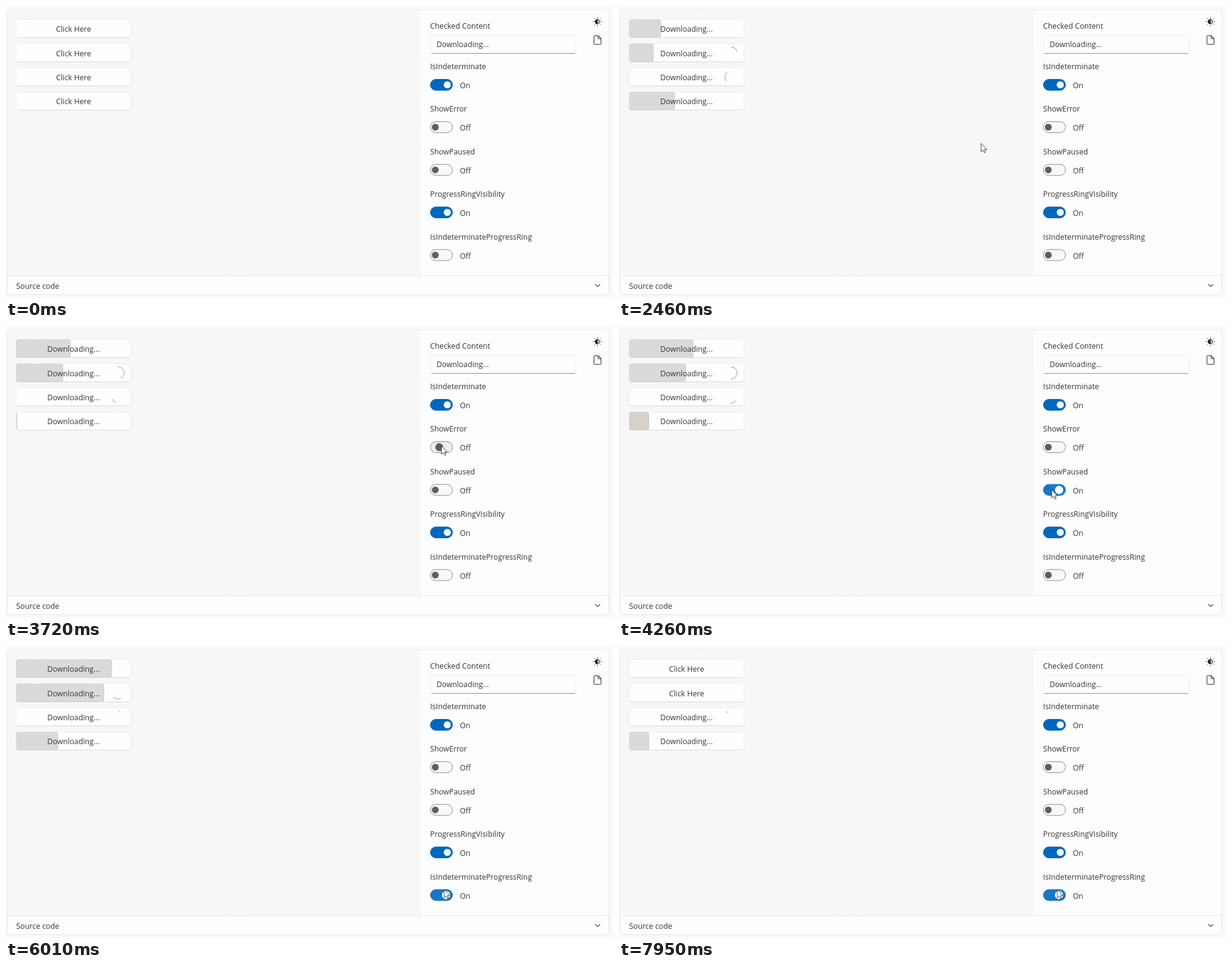
An HTML page for the animation above (8000 ms loop, 989 px wide and 476 px high).

```html
<!DOCTYPE html>
<html lang="en">
<head>
<meta charset="utf-8">
<title>Progress buttons</title>
<style>
  html, body { margin: 0; width: 100%; height: 100%; overflow: hidden; background: #f9f9f9; }
  svg { display: block; width: 100%; height: 100%; }
  text { font: 12.3px "Open Sans", "Noto Sans", sans-serif; fill: #353535; }
</style>
</head>
<body>
<svg id="stage" viewBox="0 0 989 476">
  <defs>
    <linearGradient id="tint" x1="0" y1="1" x2="0.7" y2="0">
      <stop offset="0" stop-color="#faf8f7"/>
      <stop offset="0.5" stop-color="#f7f7f7"/>
      <stop offset="1" stop-color="#f8f8f8"/>
    </linearGradient>
  </defs>
  <rect x="1.5" y="6.5" width="981" height="464" rx="7" fill="url(#tint)" stroke="#ebebeb"/>
  <path d="M676 7H975q7 0 7 7V439H676Z" fill="#fdfdfd"/>
  <path d="M2 439.5H982V464q0 6.500 -7 6.500H9q-7 0 -7 -6.500Z" fill="#fdfdfd" stroke="#e8e8e8"/>
  <text x="16.500" y="461">Source code</text>
  <path d="M960 453.500l4 4 4-4" fill="none" stroke="#444" stroke-width="1.100"/>

  <text x="691" y="37">Checked Content</text>
  <rect x="691.500" y="47.500" width="237" height="30" rx="3.500" fill="#fefefe" stroke="#ececec"/>
  <path d="M693 77.300H927" stroke="#8c8c8c"/>
  <text x="701.500" y="66.500">Downloading...</text>

  <g id="sun" fill="none" stroke="#222" stroke-linecap="round">
    <circle cx="963.500" cy="25.500" r="3.600"/>
    <path d="M963.500 21.900a3.600 3.600 0 0 0 0 7.200Z" fill="#222"/>
  </g>
  <path d="M959.500 48.500H965l4.500 4.500v8q0 1.500 -1.500 1.500h-8.500q-1.500 0 -1.500 -1.500v-11q0 -1.500 1.500 -1.500ZM964.800 48.700v4.500h4.500" fill="none" stroke="#3a3a3a" stroke-width="1.100"/>
</svg>
<script>
const LOOP = 8000, LEFT = 16.5, WIDTH = 187, HEIGHT = 29.5;
const RATE = 0.9875; // recorded clock against control clock
const stage = document.getElementById('stage');

function add(parent, tag, attrs, content) {
  const node = document.createElementNS('http://www.w3.org/2000/svg', tag);
  set(node, attrs);
  if (content) node.textContent = content;
  return parent.appendChild(node);
}
function set(node, attrs) {
  for (const key in attrs) node.setAttribute(key, attrs[key]);
}
const clamp = x => Math.min(1, Math.max(0, x));
const smooth = x => x * x * (3 - 2 * x);
const linear = x => x;
const mod = (a, n) => ((a % n) + n) % n;

function sample(rows, t, ease) {
  if (t <= rows[0][0]) return rows[0].slice(1);
  for (let i = 1; i < rows.length; i++) {
    const a = rows[i - 1], b = rows[i];
    if (t < b[0]) {
      const k = ease((t - a[0]) / (b[0] - a[0]));
      return a.slice(1).map((v, j) => v + (b[j + 1] - v) * k);
    }
  }
  return rows[rows.length - 1].slice(1);
}

// cubic-bezier(.4, 0, .6, 1)
function spline(x) {
  x = clamp(x);
  let lo = 0, hi = 1;
  for (let i = 0; i < 18; i++) {
    const u = (lo + hi) / 2, v = 1 - u;
    if (1.2 * u * v * v + 1.8 * u * u * v + u ** 3 < x) lo = u; else hi = u;
  }
  return smooth(lo);
}

const RING_SWITCH = 5655;
const ERROR = [2990, 3650], PAUSED = [4050, 4735];
const inside = (span, t) => t >= span[0] && t < span[1];

const pointer = [
  [70, 150, 62], [420, 135, 36], [660, 135, 36], [980, 133, 78], [1120, 133, 78],
  [1400, 131, 117], [1530, 131, 117], [1720, 129, 150], [1950, 129, 150],
  [2310, 612, 214], [2420, 590, 224], [2470, 590, 224], [2540, 600, 213],
  [2930, 710, 187], [3660, 710, 187], [3960, 705, 267], [4750, 705, 267],
  [5030, 710, 340], [5400, 714, 397]
];

const buttons = [
  { y: 22, click: 640, end: 7090, fill: [[640, 0], [1060, 12.5], [2460, 51.5], [6010, 155.5], [7090, 187]] },
  { y: 61.5, click: 1100, end: 7560, fill: [[1100, 0], [2460, 39.5], [6010, 143], [7560, 187]], ring: true },
  { y: 100.7, click: 1510, end: LOOP, ring: true, endless: true },
  { y: 140.2, click: 1945, end: LOOP, slide: true }
];
const toggles = [
  { label: 'IsIndeterminate', y: 128.5, on: [-500, 9000] },
  { label: 'ShowError', y: 197.5, on: ERROR },
  { label: 'ShowPaused', y: 267.2, on: PAUSED },
  { label: 'ProgressRingVisibility', y: 336.5, on: [-500, 9000] },
  { label: 'IsIndeterminateProgressRing', y: 406, on: [RING_SWITCH, 9000] }
];

for (let i = 0; i < 8; i++) {
  const a = i * Math.PI / 4, c = Math.cos(a), s = Math.sin(a);
  add(document.getElementById('sun'), 'path', {
    d: `M${963.5 + 6.2 * c} ${25.5 + 6.2 * s}L${963.5 + 7 * c} ${25.5 + 7 * s}`
  });
}

buttons.forEach((b, i) => {
  const box = { x: LEFT, y: b.y, width: WIDTH, height: HEIGHT, rx: 3.5 };
  add(add(stage, 'clipPath', { id: 'clip' + i }), 'rect', box);
  b.face = add(stage, 'rect', { ...box, stroke: '#ececec' });
  add(stage, 'path', { d: `M19 ${b.y + HEIGHT}H201`, stroke: '#dcdcdc' });
  const group = add(stage, 'g', { 'clip-path': `url(#clip${i})` });
  b.bars = [0, 1].map(() => add(group, 'rect', { y: b.y + 0.5, height: HEIGHT - 1, rx: 3 }));
  b.text = add(stage, 'text', { x: 110, y: b.y + 20, 'text-anchor': 'middle' });
  b.arc = add(stage, 'path', { fill: 'none', stroke: '#b6d4ef', 'stroke-width': 2, 'stroke-linecap': 'round' });
});

toggles.forEach(g => {
  add(stage, 'text', { x: 691, y: g.y - 25.5 }, g.label);
  g.pill = add(stage, 'rect', { x: 691.5, y: g.y - 9, width: 36, height: 18, rx: 9 });
  g.knob = add(stage, 'circle', { cy: g.y });
  g.state = add(stage, 'text', { x: 739.5, y: g.y + 5.5 });
});

const cursor = add(stage, 'path', {
  d: 'M0 0V13.500L3.200 10.600L5.300 15.200L7.300 14.300L5.300 9.800H9.400Z',
  fill: '#fff', stroke: '#333', 'stroke-width': 0.9
});

function arcPath(cy, from, to) {
  const point = deg => {
    const a = deg * Math.PI / 180;
    return `${182.5 + 10 * Math.sin(a)} ${cy - 10 * Math.cos(a)}`;
  };
  return `M${point(from)}A10 10 0 ${to - from > 180 ? 1 : 0} 1 ${point(to)}`;
}

function spinner(start, t) {
  const s = mod((t - start) * RATE, 2000) / 1000;
  const turn = 450 * s;
  return [turn + 180 * Math.max(0, s - 1), turn + 180 * Math.min(1, s)];
}

function slidingBars(t) {
  if (inside(ERROR, t) || inside(PAUSED, t)) {
    const start = inside(ERROR, t) ? ERROR[0] : PAUSED[0];
    return [[WIDTH * (spline((t - start) / 750) - 1), WIDTH], [0, 0]];
  }
  const start = t >= PAUSED[1] ? PAUSED[1] : t >= ERROR[1] ? ERROR[1] : 1945;
  const s = mod((t - start) * RATE, 2000);
  const short = WIDTH * 0.4, long = WIDTH * 0.6;
  return [
    [short * (4 * spline(s / 1500) - 1), short],
    [long * (3.16 * spline((s - 750) / 1250) - 1.5), long]
  ];
}

function drawButton(b, t) {
  const active = t >= b.click && t < b.end;
  const pressed = t >= b.click - 110 && t < b.click;
  set(b.face, { fill: pressed ? '#f8f8f8' : '#fefefe' });
  b.text.textContent = active ? 'Downloading...' : 'Click Here';
  b.text.style.fill = pressed ? '#8c8c8c' : '';

  let spans = [[0, 0], [0, 0]], colors = ['#dadada', '#cecece'];
  if (active && b.fill) spans[0] = [0, sample(b.fill, t, linear)[0]];
  if (active && b.slide) {
    spans = slidingBars(t);
    if (inside(ERROR, t)) colors = ['#e4c1c2', '#d9b3b4'];
    if (inside(PAUSED, t)) colors = ['#d7d1c8', '#cbc4ba'];
  }
  b.bars.forEach((bar, i) => {
    const [x, width] = spans[i];
    set(bar, { x: LEFT + x, width, fill: colors[0], stroke: width ? colors[1] : 'none' });
  });

  let d = '';
  if (active && b.ring) {
    const [from, to] = b.endless ? spinner(1945, t)
      : t >= RING_SWITCH ? spinner(RING_SWITCH, t)
      : [0, spans[0][1] / WIDTH * 360];
    d = arcPath(b.y + 15, from, to);
  }
  set(b.arc, { d });
}

function drawToggle(g, t, px, py) {
  const on = inside(g.on, t);
  const hover = px > 690 && px < 729 && Math.abs(py - g.y) < 11;
  const shift = clamp((t - g.on[0]) / 120) - clamp((t - g.on[1]) / 120);
  set(g.pill, {
    fill: on ? (hover ? '#1a76c6' : '#0067c0') : (hover ? '#efefef' : '#f8f8f8'),
    stroke: on ? (hover ? '#1a76c6' : '#0067c0') : '#8c8c8c'
  });
  set(g.knob, {
    cx: 699.5 + (hover ? 17.5 : 19.5) * smooth(shift),
    r: (on ? 5.8 : 5.5) + (hover ? 0.9 : 0),
    fill: on ? '#fff' : '#5e5e5e'
  });
  g.state.textContent = on ? 'On' : 'Off';
}

function draw() {
  const t = performance.now() % LOOP;
  const [px, py] = sample(pointer, t, smooth);
  buttons.forEach(b => drawButton(b, t));
  toggles.forEach(g => drawToggle(g, t, px, py));
  set(cursor, { transform: `translate(${px} ${py})`, visibility: t < 70 ? 'hidden' : 'visible' });
  requestAnimationFrame(draw);
}
draw();
</script>
</body>
</html>
```
